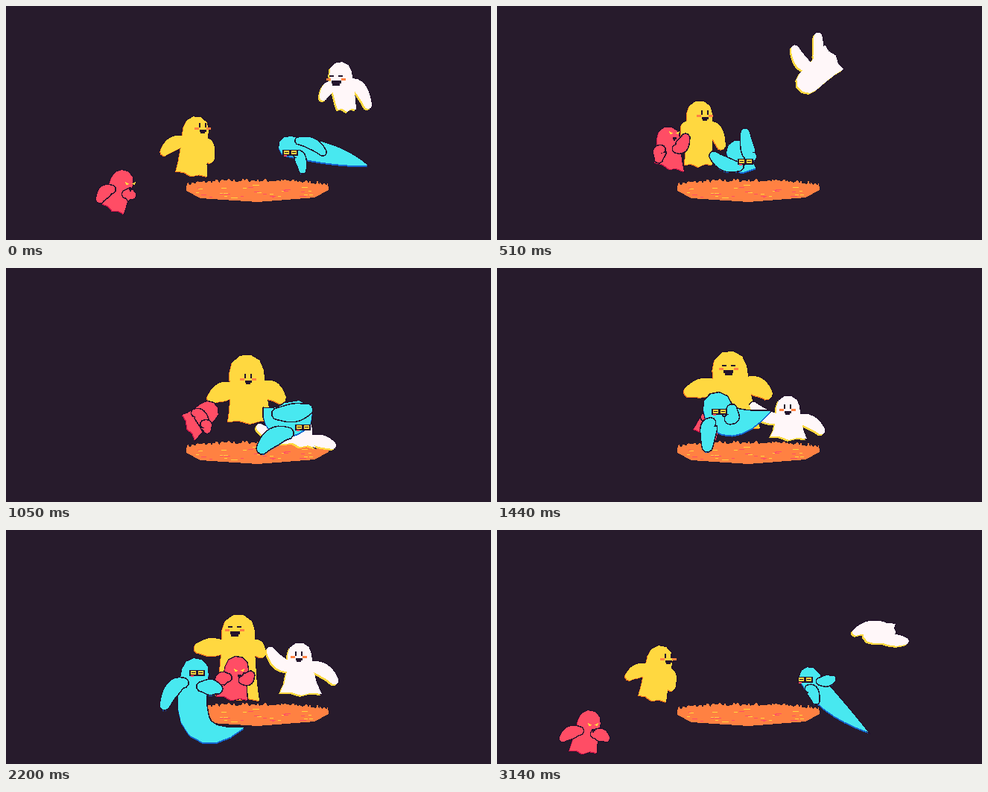
An HTML page for the animation above (3240 ms loop, 651 by 314 pixels).

```html
<!DOCTYPE html>
<html lang="en">
<meta charset="utf-8">
<title>Ghosts around the fire</title>
<style>
  html, body { margin: 0; height: 100%; overflow: hidden; background: #271b2c; }
  svg { display: block; width: 100%; height: 100%; }
</style>
<svg viewBox="0 0 651 314" shape-rendering="crispEdges"><g id="fire"></g><g id="cast"></g></svg>
<script>
const LOOP = 3240;
const DARK = '#24142c', YELLOW = '#ffd840', RED = '#ff4d65', ORANGE = '#ff8142';
const OPEN = 0, HAPPY = 1, ANGRY = 2, GLASSES = 3, HIDDEN = -1;

// Pose rows: head x y radius, left hem (or spine bend), right hem (or tail tip),
// left hand, right hand, point between the eyes, expression.
const yellow = {
  fill: YELLOW, shade: '#ff7a1c', shift: [-1, 1], cheek: ORANGE,
  poses: [
    [255, 165, 17, 228, 222, 270, 229, 213, 195, 274, 205, 264, 160, OPEN],
    [272, 144, 17, 252, 213, 289, 213, 253, 172, 301, 187, 279, 143, OPEN],
    [323, 139, 23, 298, 206, 358, 206, 278, 174, 368, 174, 325, 145, OPEN],
    [305, 131, 23, 284, 222, 350, 221, 246, 160, 358, 165, 301, 121, HAPPY],
    [312, 135, 22, 282, 222, 340, 229, 260, 158, 342, 164, 307, 130, HAPPY],
    [345, 138, 22, 318, 222, 373, 234, 292, 177, 373, 176, 339, 133, HAPPY],
    [219, 172, 17, 190, 222, 227, 231, 178, 196, 234, 210, 230, 169, OPEN]
  ]
};

const mix = (a, b, k) => a + (b - a) * k;
const mixPoint = (p, q, k) => p.map((v, i) => mix(v, q[i], k));
const sub = (p, q) => [p[0] - q[0], p[1] - q[1]];
const dot = (p, q) => p[0] * q[0] + p[1] * q[1];
const unit = p => { const n = Math.hypot(...p) || 1; return [p[0] / n, p[1] / n]; };
const along = (p, d, n) => [p[0] + d[0] * n, p[1] + d[1] * n];
const bend = (p, c, q, t) => mixPoint(mixPoint(p, c, t), mixPoint(c, q, t), t);

const red = {
  fill: RED, shade: '#d2164a', shift: [-1, 1], cheek: RED, brow: YELLOW, front: true,
  poses: [
    [156, 235, 15, 130, 266, 158, 279, 126, 259, 169, 254, 167, 238, ANGRY],
    [230, 177, 15, 212, 210, 251, 222, 217, 205, 253, 177, 238, 170, ANGRY],
    [271, 193, 14, 237, 197, 254, 231, 268, 216, 270, 217, 276, 193, HIDDEN],
    [308, 190, 14, 282, 229, 320, 231, 298, 182, 322, 188, 309, 185, HIDDEN],
    [310, 185, 15, 283, 223, 324, 228, 285, 203, 328, 195, 313, 188, ANGRY],
    [322, 187, 14, 302, 226, 340, 228, 306, 207, 338, 206, 323, 189, ANGRY],
    [124, 257, 15, 97, 296, 134, 299, 89, 279, 146, 279, 129, 261, ANGRY]
  ]
};

const polygon = (points, fill, extra = '') =>
  `<polygon points="${points.map(p => p.map(v => v.toFixed(1))).join(' ')}" fill="${fill}" ${extra}/>`;
const outlined = (points, fill) =>
  polygon(points, fill, `stroke="${DARK}" stroke-width="3" paint-order="stroke"`);
const box = (x, y, w, h, fill) =>
  `<rect x="${x - w / 2}" y="${y}" width="${w}" height="${h}" fill="${fill}"/>`;

// Half circle that turns from one side, over dir, to the other.
function cap(center, dir, radius, side) {
  return [0, 1, 2, 3, 4, 5].map(i => {
    const angle = Math.PI * i / 5;
    return along(along(center, side, -Math.cos(angle) * radius), dir, Math.sin(angle) * radius);
  });
}

// Closed shape around a bent line with a varying half width.
function limb(start, control, end, width) {
  const left = [], right = [];
  for (let t = 0; t < 1.01; t += .125) {
    const p = bend(start, control, end, t);
    const d = unit(sub(bend(start, control, end, t + .01), bend(start, control, end, t - .01)));
    left.push(along(p, [d[1], -d[0]], width(t)));
    right.unshift(along(p, [d[1], -d[0]], -width(t)));
  }
  const head = unit(sub(start, control)), tip = unit(sub(end, control));
  return [
    ...left, ...cap(end, tip, width(1), [-tip[1], tip[0]]),
    ...right, ...cap(start, head, width(0), [-head[1], head[0]])
  ];
}

const white = {
  fill: '#fff7f9', shade: YELLOW, shift: [-2, 2], cheek: ORANGE, brow: DARK,
  poses: [
    [449, 90, 15, 445, 139, 470, 139, 426, 122, 486, 133, 443, 94, HAPPY],
    [418, 101, 16, 440, 52, 465, 85, 400, 58, 431, 41, 418, 105, HIDDEN],
    [396, 215, 15, 375, 234, 415, 241, 341, 214, 438, 238, 396, 215, HIDDEN],
    [387, 168, 16, 362, 221, 417, 222, 347, 166, 433, 205, 386, 166, OPEN],
    [394, 167, 16, 368, 218, 424, 220, 355, 162, 441, 202, 393, 166, OPEN],
    [398, 170, 16, 370, 226, 425, 222, 351, 172, 445, 206, 398, 168, ANGRY],
    [505, 138, 14, 535, 126, 530, 149, 482, 137, 548, 149, 505, 138, HIDDEN]
  ]
};

function body(head, radius, left, right, up, side) {
  const flare = (sign, hem) => {
    const neck = along(head, side, sign * radius);
    const drop = .6 * dot(sub(head, mixPoint(left, right, .5)), up);
    return [0, .35, .7, 1].map(t => bend(neck, along(neck, up, -drop), hem, t));
  };
  const hem = [.75, .5, .25].map((k, i) => along(mixPoint(left, right, k), up, i % 2 ? -3 : 1));
  return [...cap(head, up, radius, side), ...flare(1, right), ...hem, ...flare(-1, left).reverse()];
}

function face(x, y, mood, { cheek, brow }) {
  if (mood === HIDDEN) return '';
  const gap = mood === HAPPY ? 6 : 4;
  if (mood === GLASSES) {
    return box(x, y - 3, 21, 8, DARK) + box(x - 5, y - 2, 7, 5, YELLOW) + box(x + 5, y - 2, 7, 5, YELLOW) +
      box(x - 5, y, 5, 1, DARK) + box(x + 5, y, 5, 1, DARK) + box(x - 6, y + 4, 4, 2, RED);
  }
  const eyes = [-1, 1].map(sign => {
    const ex = x + sign * gap;
    if (mood === OPEN) return box(ex, y - 3, 2, 6, DARK);
    if (mood === HAPPY) return box(ex, y - 1, 6, 2, DARK);
    return polygon([[ex - sign * 3, y + 1], [ex + sign * 3, y - 2], [ex + sign * 2, y + 2]], brow);
  }).join('');
  const cheeks = cheek === RED ? '' : box(x - gap - 4, y + 3, 6, 3, cheek) + box(x + gap + 4, y + 3, 6, 3, cheek);
  const wide = brow === YELLOW ? 5 : gap * 2 + 1;
  return cheeks + eyes + box(x, y + 6, wide, gap / 2 + 1, DARK) + box(x, y + 7, wide - 3, gap, DARK);
}

const cyan = {
  fill: '#48e8f0', shade: '#1565d0', shift: [0, 2], cheek: RED, front: true, tail: true,
  poses: [
    [379, 188, 13, 435, 196, 486, 214, 398, 220, 425, 196, 381, 196, GLASSES],
    [324, 196, 16, 342, 220, 337, 210, 291, 201, 333, 170, 333, 208, GLASSES],
    [390, 199, 21, 365, 212, 346, 188, 344, 242, 404, 190, 398, 213, GLASSES],
    [233, 178, 18, 262, 230, 382, 194, 241, 238, 256, 190, 232, 178, GLASSES],
    [254, 190, 18, 232, 300, 320, 265, 213, 235, 284, 213, 256, 191, GLASSES],
    [267, 177, 17, 186, 212, 207, 290, 216, 209, 300, 195, 274, 179, GLASSES],
    [419, 197, 13, 440, 230, 498, 271, 428, 229, 450, 200, 413, 200, GLASSES]
  ]
};

function drawGhost(ghost, row) {
  const [hx, hy, radius, lx, ly, rx, ry, ax, ay, bx, by, fx, fy, mood] = row;
  const head = [hx, hy], left = [lx, ly], right = [rx, ry], hands = [[ax, ay], [bx, by]];
  const up = unit(sub(head, ghost.tail ? left : mixPoint(left, right, .5)));
  const across = ghost.tail ? sub(hands[1], hands[0]) : sub(right, left);
  let side = [-up[1], up[0]];
  if (dot(side, across) < 0) side = side.map(v => -v);

  const torso = ghost.tail
    ? limb(head, left, right, t => radius * (1 - t * t) * (1 + .6 * t))
    : body(head, radius, left, right, up, side);
  const arms = hands.map((hand, i) => {
    const shoulder = along(along(head, up, -radius), side, (i ? .7 : -.7) * radius);
    const elbow = [mix(shoulder[0], hand[0], .6), shoulder[1]];
    return limb(shoulder, elbow, hand, t => radius * (.35 + .2 * Math.sin(Math.PI * t)));
  });

  const parts = [...arms, torso];
  return parts.map(part => outlined(part, ghost.shade)).join('') +
    parts.map(part => polygon(part.map(p => along(p, ghost.shift, 1)), ghost.shade)).join('') +
    parts.map(part => polygon(part, ghost.fill)).join('') +
    (ghost.front ? arms.map(arm => outlined(arm, ghost.fill)).join('') : '') +
    face(fx, fy, mood, ghost);
}

function drawFire() {
  let seed = 7, flecks = '';
  const random = () => (seed = seed * 16807 % 2147483647) / 2147483647;
  const edge = [];
  for (let x = 242; x <= 432; x += 2) {
    const arch = Math.sqrt(1 - ((x - 337) / 97) ** 2);
    edge.push([x, 244 - 7 * arch - random() * 6]);
  }
  edge.push([433, 247], [414, 257], [338, 263], [261, 258], [242, 248]);
  for (let i = 0; i < 34; i++) {
    flecks += box(337 + (random() * 2 - 1) * 80, 240 + random() * 17, 3 + random() * 6, 1, i % 2 ? YELLOW : RED);
  }
  fire.innerHTML = polygon(edge, ORANGE) + flecks;
}

// Start times of the held drawings, grouped by the pose they leave.
const beats = [
  [0, 120, 270, 390], [510, 660, 780, 900], [1050, 1170, 1290, 1440, 1570],
  [1720, 1840, 1960, 2080], [2200, 2350, 2500], [2620]
];
const steps = beats.flatMap((times, from) =>
  times.map((time, i) => ({ time, from, to: from + 1, part: i / times.length })));
steps.push({ time: 3020, from: 6, to: 0, part: -.3 }, { time: 3140, from: 6, to: 0, part: 0 });

function drawCast({ from, to, part }) {
  cast.innerHTML = [yellow, red, white, cyan].map(ghost => {
    const a = ghost.poses[from], b = ghost.poses[to];
    const row = a.map((v, i) => mix(v, b[i], part));
    row[row.length - 1] = (part < .5 ? a : b).at(-1);
    // White leaps in an arc at the start.
    if (ghost === white && from === 0) {
      for (let i = 1; i < 13; i += i === 1 ? 3 : 2) row[i] -= 110 * part * (1 - part);
    }
    return drawGhost(ghost, row);
  }).join('');
}

const fire = document.getElementById('fire'), cast = document.getElementById('cast');
let shown;

function render() {
  const now = performance.now() % LOOP;
  const step = steps.filter(s => s.time <= now).pop();
  if (step !== shown) drawCast(shown = step);
  requestAnimationFrame(render);
}

drawFire();
render();
</script>
</html>
```
